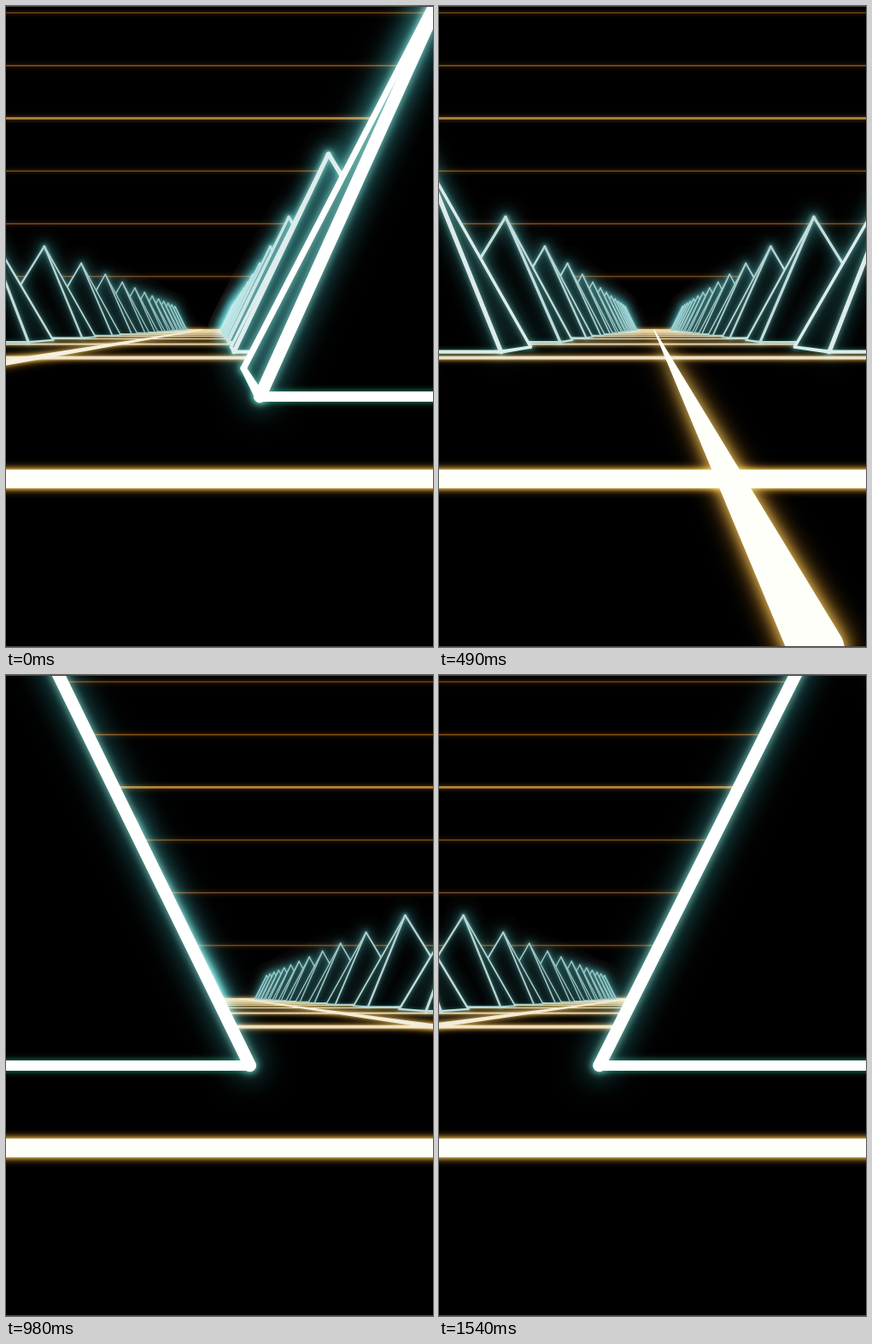
Recreate the animation shown at these times as an HTML page with a canvas. Size 500x750 px, loop 1610 ms.

```html
<!DOCTYPE html>
<html lang="en">
<head>
<meta charset="utf-8">
<title>Neon pyramids</title>
<style>
html, body { margin: 0; width: 100%; height: 100%; overflow: hidden; background: #000; }
canvas { display: block; width: 500px; height: 750px; }
</style>
</head>
<body>
<canvas id="stage" width="500" height="750"></canvas>
<script>
const ctx = document.getElementById('stage').getContext('2d');
const W = 500, H = 750;
const STEP = 70, STEPS = 23;

// Ground units: eye height is 1, and a ground point at depth z lies 1/z px below the horizon.
const EYE_X = 250, HORIZON = 375.5;
const ROWS = 15, ROW_GAP = 0.02205, COLUMN_GAP = 21.85;
const FRONT = 0.01227, BACK = 0.02062, MIDDLE = (FRONT + BACK) / 2;
const HALF = 4.33, PEAK = 7.79;
const START = -16.94, SPEED = 0.932;
const FIRST_LINE = 0.00562;
const OFFSTAGE = 3000;

const project = (x, y, z) => [EYE_X + x / z, HORIZON - y / z];
const rgb = (r, g, b) => `rgb(${r | 0},${g | 0},${b | 0})`;

function trace(points) {
  ctx.beginPath();
  points.forEach(([x, y]) => ctx.lineTo(x, y));
  ctx.closePath();
}

// A line as a quad whose width runs from w1 to w2, with round ends.
function bar([x1, y1], [x2, y2], w1, w2 = w1, dx = 0) {
  const len = Math.hypot(x2 - x1, y2 - y1) || 1;
  const nx = (y1 - y2) / len / 2, ny = (x2 - x1) / len / 2;
  const angle = Math.atan2(ny, nx);
  ctx.beginPath();
  ctx.moveTo(x1 + nx * w1 + dx, y1 + ny * w1);
  ctx.arc(x1 + dx, y1, w1 / 2, angle, angle + Math.PI);
  ctx.lineTo(x2 - nx * w2 + dx, y2 - ny * w2);
  ctx.arc(x2 + dx, y2, w2 / 2, angle + Math.PI, angle + Math.PI * 2);
  ctx.fill();
}

// Only the blurred shadow reaches the stage.
function glow(a, b, w1, w2, blur, color) {
  ctx.save();
  ctx.globalCompositeOperation = 'screen';
  ctx.shadowColor = color;
  ctx.shadowBlur = blur;
  ctx.shadowOffsetX = OFFSTAGE;
  ctx.fillStyle = '#000';
  bar(a, b, w1, w2, -OFFSTAGE);
  ctx.restore();
}

function core(a, b, w1, w2, color) {
  ctx.fillStyle = color;
  bar(a, b, w1, w2);
}

function drawSky() {
  const tints = [[112, 68, 12], [135, 80, 18], [176, 130, 62], [104, 70, 16], [118, 72, 32], [112, 70, 24]];
  tints.forEach(([r, g, b], i) => {
    const y = 8 + i * 61.7, width = i === 2 ? 2.6 : 1.6;
    const a = [-20, y], z = [W + 20, y];
    glow(a, z, width + 1.5, width + 1.5, 5, rgb(r * 0.45, g * 0.4, b * 0.25));
    core(a, z, width, width, rgb(r, g, b));
  });
}

function goldLine(a, b, w1, w2, spread = 1) {
  const q = Math.min(1, Math.sqrt(Math.max(w1, w2) / 16));
  const halo = w => w + 1 + spread * Math.min(3, w * 0.15);
  glow(a, b, halo(w1), halo(w2), (3 + 6 * q) * spread, rgb(60 + 110 * q, 38 + 72 * q, 5 + 15 * q));
  glow(a, b, w1, w2, (2 + 3 * q) * spread, rgb(90 + 130 * q, 75 + 110 * q, 45 + 55 * q));
  core(a, b, Math.max(1, w1 - 1), Math.max(1, w2 - 1), rgb(215 + 40 * q, 190 + 65 * q, 140 + 110 * q));
}

function drawGround(shift) {
  for (let row = ROWS - 1; row >= 0; row--) {
    const z = FIRST_LINE + row * ROW_GAP, y = HORIZON + 1 / z, width = 0.128 / z;
    goldLine([-40, y], [W + 40, y], width, width);
  }
  for (let col = -1; col <= 1; col++) {
    const x = shift + (col + 0.5) * COLUMN_GAP;
    // Limit the near end so that the glow stays close to the stage.
    const near = Math.max(1 / 378, Math.abs(x) / 330), far = 0.3;
    const spread = 1 + 0.006 / near;
    goldLine(project(x, -1, far), project(x, -1, near), 0.175 / far, 0.175 / near, spread);
  }
}

function drawPyramid(x, row) {
  const offset = row * ROW_GAP;
  const front = FRONT + offset, back = BACK + offset;
  const scale = FRONT / front, root = Math.sqrt(scale);
  const left = x - HALF, right = x + HALF;
  const apex = project(x, PEAK, MIDDLE + offset);
  const leftFoot = project(left, -1, front), rightFoot = project(right, -1, front);
  const q = Math.min(1, root * 1.3);
  const ink = rgb(105 + 150 * q, 168 + 87 * q, 172 + 83 * q);
  const line = (k, z) => Math.max(1.2, k / z);

  const slopeWidth = line(0.18, front), baseWidth = line(0.15, front), backWidth = line(0.15, back);
  const slopes = [[leftFoot, apex, slopeWidth, slopeWidth], [rightFoot, apex, slopeWidth, slopeWidth]];
  const bases = [[leftFoot, rightFoot, baseWidth, baseWidth]];
  const faces = [[leftFoot, apex, rightFoot]];

  const side = left > 0 ? left : right < 0 ? right : null;
  if (side !== null) {
    const foot = side === left ? leftFoot : rightFoot;
    const backFoot = project(side, -1, back);
    faces.push([foot, apex, backFoot]);
    slopes.unshift([backFoot, apex, backWidth, backWidth]);
    bases.push([backFoot, foot, backWidth, baseWidth]);
  }

  ctx.fillStyle = '#000';
  faces.forEach(face => { trace(face); ctx.fill(); });

  const halo = 4 + 28 * scale, depth = 0.35 + 0.65 * q;
  slopes.forEach(([a, b]) => glow(a, b, halo, halo, 6 + 26 * root, rgb(26 * depth, 82 * depth, 84 * depth)));
  slopes.forEach(([a, b, w]) => {
    const rim = w + 1 + 3 * scale;
    glow(a, b, rim, rim, 2 + 7 * root, rgb(88 * q, 142 * q, 128 * q));
  });
  bases.forEach(([a, b, v, w]) => glow(a, b, v + 1, w + 1, 2 + 5 * root, rgb(25 * q, 140 * q, 105 * q)));
  [...bases, ...slopes].forEach(([a, b, v, w]) => core(a, b, v, w, ink));
}

function draw(step) {
  const shift = START + SPEED * step;
  ctx.fillStyle = '#000';
  ctx.fillRect(0, 0, W, H);
  drawSky();
  drawGround(shift);
  for (let row = ROWS - 1; row >= 0; row--) {
    for (let col = -1; col <= 1; col++) {
      const x = shift + col * COLUMN_GAP;
      if (Math.abs(x) < 21) drawPyramid(x, row);
    }
  }
  ctx.fillStyle = '#484848';
  ctx.fillRect(0, 0, W, 1);
  ctx.fillRect(0, H - 1, W, 1);
}

let shown = -1;
function tick() {
  const step = Math.floor(performance.now() / STEP) % STEPS;
  if (step !== shown) draw(shown = step);
  requestAnimationFrame(tick);
}
tick();
</script>
</body>
</html>
```
